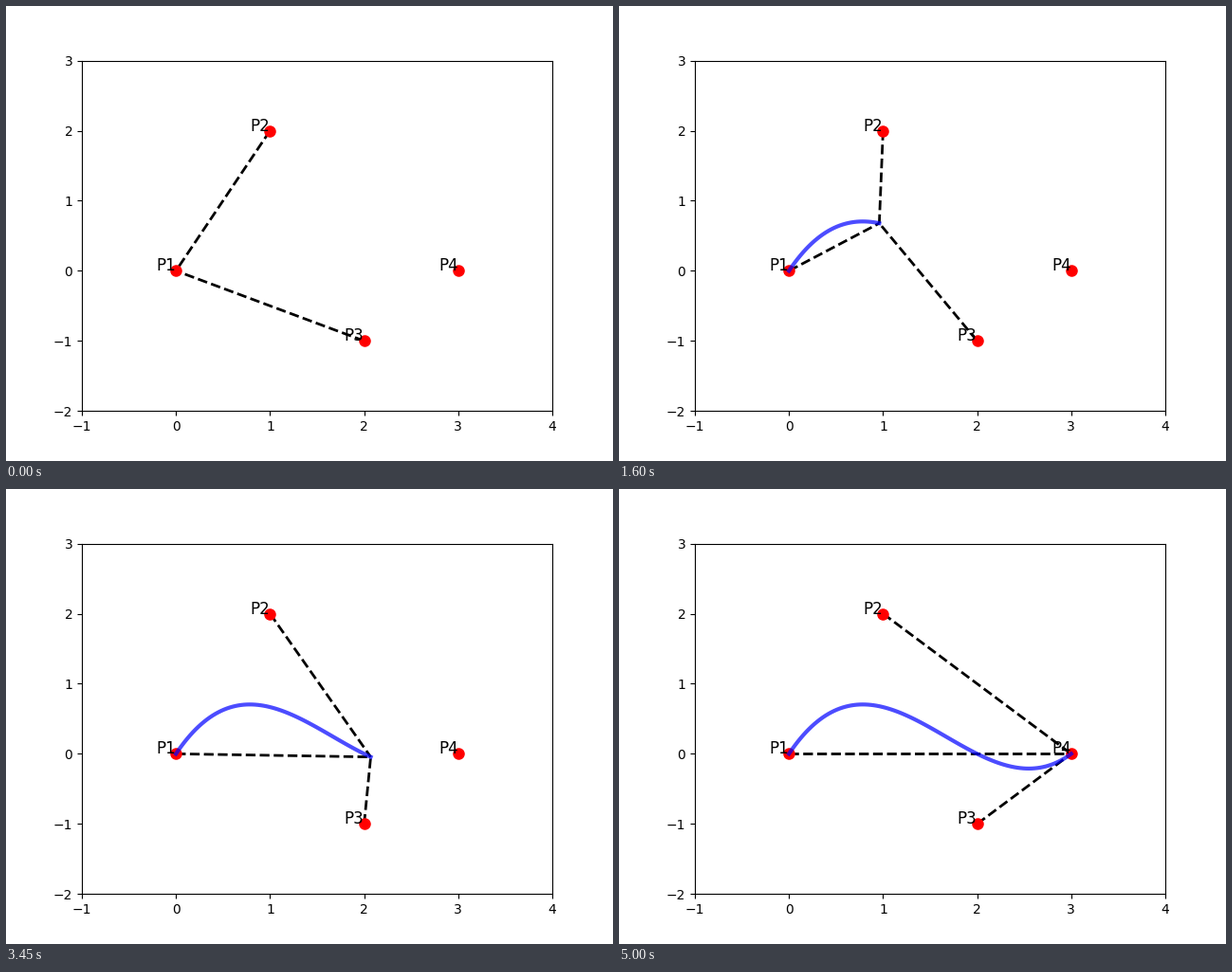
Animation, 640 px wide and 480 px high, one loop 5050 ms. Source, as a matplotlib script:

```python
import numpy as np
import matplotlib.pyplot as plt
from matplotlib.animation import FuncAnimation

STEPS = 101
INTERVAL = 50

points = np.array([[0, 0], [1, 2], [2, -1], [3, 0]], dtype=float)


def bezier(t):
    """Cubic Bezier curve through the four control points."""
    t = np.asarray(t)[:, None]
    p1, p2, p3, p4 = points
    return ((1 - t) ** 3 * p1 + 3 * t * (1 - t) ** 2 * p2
            + 3 * t ** 2 * (1 - t) * p3 + t ** 3 * p4)


curve = bezier(np.linspace(0, 1, STEPS))

fig, ax = plt.subplots(figsize=(6.4, 4.8), dpi=100)
ax.set_xlim(-1, 4)
ax.set_ylim(-2, 3)

# Arms lie under the dots, the curve over them.
arms = [ax.plot([], [], "k--", lw=2)[0] for _ in range(3)]
ax.plot(points[:, 0], points[:, 1], "ro", markersize=8)
trail, = ax.plot([], [], "b-", lw=3, alpha=0.7)

for n, (x, y) in enumerate(points, start=1):
    ax.text(x, y, f"P{n}", fontsize=12, ha="right")


def update(i):
    x, y = curve[i]
    for arm, (px, py) in zip(arms, points):
        arm.set_data([px, x], [py, y])
    trail.set_data(curve[:i + 1, 0], curve[:i + 1, 1])
    return [*arms, trail]


def reset():
    return update(0)


anim = FuncAnimation(fig, update, frames=STEPS, init_func=reset,
                     interval=INTERVAL, repeat=True, repeat_delay=0)
plt.show()
```
